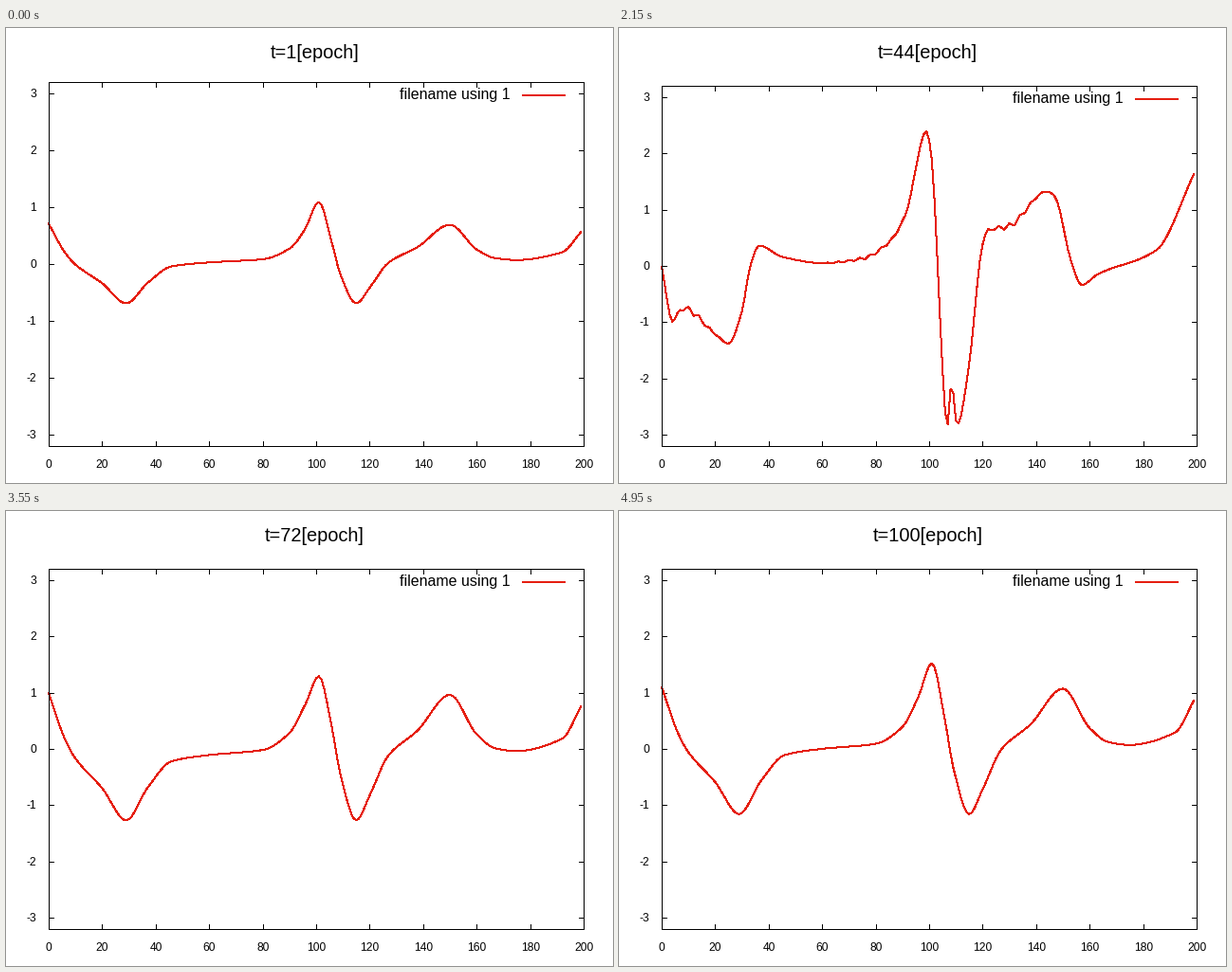
Animation, 640 px wide and 480 px high, one loop 5000 ms. Source, as a matplotlib script:

```python
import numpy as np
import matplotlib.pyplot as plt
from matplotlib.animation import FuncAnimation

plt.rcParams["font.family"] = "Liberation Sans"

W, H = 640, 480
LEFT, RIGHT, BOTTOM = 45, 609, 441
Y_MAX = 3.2
TICK = 5
EPOCHS = 100
RED = "#e51e10"

x = np.arange(200)


def smooth(points):
    """Cubic curve through key points that is flat at every local extreme."""
    kx, ky = np.array(points, float).T
    step = np.diff(kx)
    sec = np.diff(ky) / step
    a, b = sec[:-1], sec[1:]
    same = a * b > 0
    inner = np.where(same, 2 * a * b / np.where(same, a + b, 1), 0)
    slope = np.concatenate([sec[:1], inner, sec[-1:]])
    j = np.clip(np.searchsorted(kx, x, side="right") - 1, 0, len(step) - 1)
    h = step[j]
    u = (x - kx[j]) / h
    return ((1 + 2 * u) * (1 - u) ** 2 * ky[j] + u * (1 - u) ** 2 * h * slope[j]
            + u * u * (3 - 2 * u) * ky[j + 1] - u * u * (1 - u) * h * slope[j + 1])


def bump(centre, width):
    return np.exp(-((x - centre) / width) ** 2)


CALM = smooth([
    (0, 1.11), (6, 0.3), (10, -0.05), (20, -0.58), (29, -1.15), (37, -0.57),
    (46, -0.1), (60, 0.01), (80, 0.1), (90, 0.4), (96, 0.94), (101, 1.53),
    (106, 0.5), (109, -0.32), (115, -1.15), (120, -0.71), (127, 0),
    (138, 0.45), (150, 1.08), (160, 0.38), (167, 0.13), (175, 0.08),
    (192, 0.3), (199, 0.87)])

WILD = smooth([
    (0, 0), (4, -0.96), (8, -0.74), (20, -1.2), (25, -1.37), (30, -0.8),
    (33, -0.02), (36.5, 0.37), (45, 0.17), (60, 0.06), (75, 0.14), (85, 0.43),
    (91, 0.9), (99, 2.25), (101, 1.78), (103, 0.15), (105, -1.84),
    (107, -3.05), (111, -2.8), (115, -1.72), (120, 0.4), (122, 0.64),
    (130, 0.72), (144, 1.33), (147, 1.24), (153, 0.11), (157, -0.33),
    (163, -0.14), (185, 0.29), (199, 1.64)])

RIPPLE = np.cos(np.pi / 2 * (x - 2)) * (
    bump(11, 8) + bump(131, 9) + 0.5 * bump(78, 14))

# epoch, gain, lift, extra crest height, share of the wild shape
TIMELINE = np.array([
    (1, 0.62, 0.03, 0.12, 0),
    (11, 1, 0, 0, 1),
    (50, 1, 0, 0.15, 1),
    (54, 1, 0, 0.15, 0),
    (67, 1, 0, 0.15, 0),
    (72, 1, -0.11, -0.12, 0),
    (75, 1, -0.9, -0.12, 0),
    (78, 1, -0.2, -0.12, 0),
    (90, 1, 0.06, -0.06, 0),
    (100, 1, 0, 0, 0)]).T


def wild(epoch):
    """The notch narrows and a four-step ripple grows as training goes on."""
    k = np.clip((epoch - 29) / 15, 0, 1)
    notch = 0.95 * bump(109.2 - 0.8 * k, 1.4 - 0.2 * k)
    return WILD + notch + k * (0.05 * RIPPLE + 0.15 * bump(99, 4))


def curve(epoch):
    gain, lift, crest, share = (
        np.interp(epoch, TIMELINE[0], row) for row in TIMELINE[1:])
    calm = gain * CALM + lift + crest * bump(101, 4)
    return calm + share * (wild(epoch) - calm)


fig = plt.figure(figsize=(W / 72, H / 72), dpi=72, facecolor="white")
ax = fig.add_axes([0, 0, 1, 1])


def rule(xs, ys):
    ax.plot(xs, ys, color="black", lw=1, solid_capstyle="projecting",
            solid_joinstyle="miter")


def label(px, baseline, text, size, align):
    ax.text(px, baseline, text, size=size, ha=align, va="baseline")


def draw(i):
    epoch = i + 1
    top = 57 if epoch == 1 else 61  # the first plot is laid out a bit taller
    scale = (BOTTOM - top) / (2 * Y_MAX)
    zero = (BOTTOM + top) / 2

    ax.clear()
    ax.set(xlim=(0, W), ylim=(H, 0))
    ax.axis("off")

    for v in range(0, 201, 20):
        px = round(LEFT + v * (RIGHT - LEFT) / 200)
        rule([px, px], [BOTTOM, BOTTOM - TICK])
        rule([px, px], [top, top + TICK])
        label(px, 464, str(v), 12, "center")
    for v in range(-3, 4):
        py = round(zero - v * scale)
        rule([LEFT, LEFT + TICK], [py, py])
        rule([RIGHT - TICK, RIGHT], [py, py])
        label(32, py + 4, str(v), 12, "right")

    label(325.5, 32, f"t={epoch}[epoch]", 20, "center")
    label(532, top + 18, "filename using 1", 16, "right")
    ax.plot([544, 590], [top + 14] * 2, color=RED, lw=2, solid_capstyle="butt")

    # Without antialiasing every touched pixel is filled: about 2 px wide.
    ax.plot(LEFT + x * (RIGHT - LEFT) / 200, zero + 0.5 - curve(epoch) * scale,
            color=RED, lw=1, antialiased=False, solid_joinstyle="round")
    rule([LEFT, RIGHT, RIGHT, LEFT, LEFT], [top, top, BOTTOM, BOTTOM, top])
    return []


anim = FuncAnimation(fig, draw, frames=EPOCHS, interval=50, repeat=True,
                     repeat_delay=0, init_func=lambda: [])
plt.show()
```
